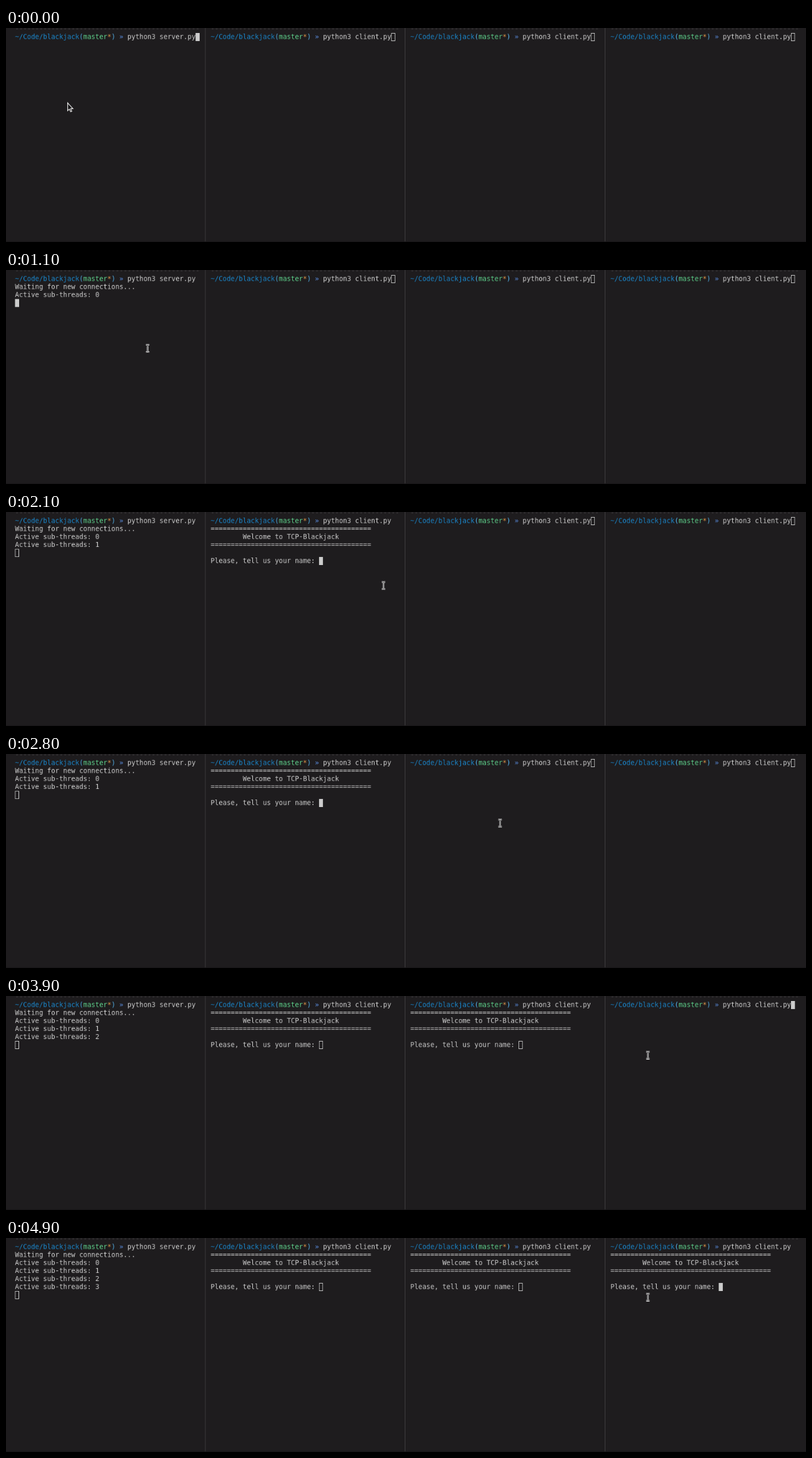
These frames come from a looping animation (1280 by 343 pixels, 5000 ms). An HTML page with a canvas:

```html
<!DOCTYPE html>
<html lang="en">
<head>
<meta charset="utf-8">
<title>Blackjack terminals</title>
<style>
  html, body { margin: 0; width: 100%; height: 100%; overflow: hidden; background: #1e1c1e; }
  canvas { display: block; width: 1280px; }
</style>
</head>
<body>
<canvas id="screen" width="1595" height="428"></canvas>
<script>
// The screen is drawn on a whole-pixel 8 x 16 character grid and shown scaled down.
const LOOP = 5000, STEP = 100;
const CELL_W = 8, CELL_H = 16, TOP = 10, ASCENT = 12;
const PANE_W = 398.75, SCALE = 1280 / 1595;
const BG = '#1e1c1e', FG = '#cccccc', WHITE = '#f2f2f2', BLACK = '#161416';
const screen = document.getElementById('screen');
const ctx = screen.getContext('2d');

function write(x, row, str, color = FG) {
  ctx.fillStyle = color;
  [...str].forEach((ch, i) => {
    if (ch !== ' ') ctx.fillText(ch, x + i * CELL_W, TOP + row * CELL_H + ASCENT);
  });
  return x + str.length * CELL_W;
}

function prompt(x, cmd) {
  const parts = [['~/Code/blackjack', '#1b85c8'], ['(', '#55b4ee'], ['master', '#5fd28c'],
    ['*', '#e39a4c'], [')', '#55b4ee'], [' » ', '#5b8fe2'], [cmd, FG]];
  for (const [str, color] of parts) x = write(x, 0, str, color);
}

function caret(x, row, col, filled) {
  const left = x + col * CELL_W, top = TOP + row * CELL_H;
  ctx.fillStyle = ctx.strokeStyle = FG;
  ctx.lineWidth = 1;
  if (filled) ctx.fillRect(left, top, CELL_W, CELL_H);
  else ctx.strokeRect(left + 0.5, top + 0.5, CELL_W - 1, CELL_H - 1);
}

// Each output line: [row, text, time it appears]
const banner = '='.repeat(40);
const clientLines = at => [
  [1, banner, at], [2, ' '.repeat(8) + 'Welcome to TCP-Blackjack', at],
  [3, banner, at], [5, 'Please, tell us your name: ', at]];

const starts = [300, 1900, 3100, 4600];
const serverLines = [[1, 'Waiting for new connections...', starts[0]],
  ...starts.map((at, i) => [i + 2, 'Active sub-threads: ' + i, at])];

const focusAt = [0, 1600, 2900, 3900, LOOP];

const panes = starts.map((at, i) => ({
  x: i ? Math.floor(408 + (i - 1) * PANE_W) : 18,
  divider: Math.floor(397 + (i - 1) * PANE_W),
  dashes: '-'.repeat(i ? 47 : 46),
  cmd: i ? 'python3 client.py' : 'python3 server.py',
  lines: i ? clientLines(at) : serverLines
}));

function drawPane({ x, divider, dashes, cmd, lines }, i, t) {
  if (i) {
    ctx.fillStyle = '#444244';
    ctx.fillRect(divider, 0, 1, 427);
  }
  write(x, -1, dashes, '#4a484a');
  prompt(x, cmd);
  const shown = lines.filter(line => t >= line[2]);
  for (const [row, str] of shown) write(x, row, str);

  const focused = t >= focusAt[i] && t < focusAt[i + 1];
  if (!shown.length) caret(x, 0, 45, focused);
  else if (i) caret(x, 5, 27, focused);
  else caret(x, shown.length + 1, 0, focused);
}

// Mouse path: [time, x, y] in page pixels
const BEAM_FROM = 600;
const mouse = [
  [0, 98, 119], [500, 98, 119], [600, 102, 127], [900, 108, 127], [1000, 146, 126],
  [1100, 226.5, 125.5], [1200, 370.5, 130], [1300, 438, 129], [1400, 461.5, 125],
  [1900, 461.5, 125], [2000, 490, 123], [2100, 604, 118], [2200, 735, 113],
  [2300, 790.5, 111], [3100, 790.5, 111], [3200, 806, 109], [3300, 867.5, 103],
  [3400, 957, 98], [3500, 1017, 96], [3600, 1027, 95], [LOOP, 1027, 95]];

function mouseAt(t) {
  const next = mouse.findIndex(key => key[0] > t);
  const [t0, x0, y0] = mouse[next - 1], [t1, x1, y1] = mouse[next];
  const f = (t - t0) / (t1 - t0);
  return [x0 + (x1 - x0) * f, y0 + (y1 - y0) * f];
}

const arrow = new Path2D('M.6 1.2V17.2L4.2 14L6.6 19L9 18L6.7 13.1H11.2Z');
const beam = new Path2D('M-3.4 -7H-1.4L0 -6L1.4 -7H3.4M0 -6V6M-3.4 7H-1.4L0 6L1.4 7H3.4');

function drawMouse(t) {
  const [x, y] = mouseAt(t);
  ctx.save();
  ctx.translate(x / SCALE, y / SCALE);
  ctx.strokeStyle = WHITE;
  if (t < BEAM_FROM) {
    ctx.fillStyle = BLACK;
    ctx.lineWidth = 1.4;
    ctx.fill(arrow);
    ctx.stroke(arrow);
  } else {
    ctx.lineWidth = 3;
    ctx.stroke(beam);
    ctx.strokeStyle = BLACK;
    ctx.lineWidth = 1;
    ctx.stroke(beam);
  }
  ctx.restore();
}

function render(t) {
  ctx.font = '13.333px "DejaVu Sans Mono", monospace';
  ctx.fillStyle = BG;
  ctx.fillRect(0, 0, screen.width, screen.height);
  ctx.fillStyle = '#171517';
  ctx.fillRect(0, 427, screen.width, 1);
  panes.forEach((pane, i) => drawPane(pane, i, t));
  drawMouse(t);
}

const origin = performance.now();
let last = -1;
function tick() {
  const t = Math.floor((performance.now() - origin) % LOOP / STEP) * STEP;
  if (t !== last) render(last = t);
  requestAnimationFrame(tick);
}
tick();
</script>
</body>
</html>
```
